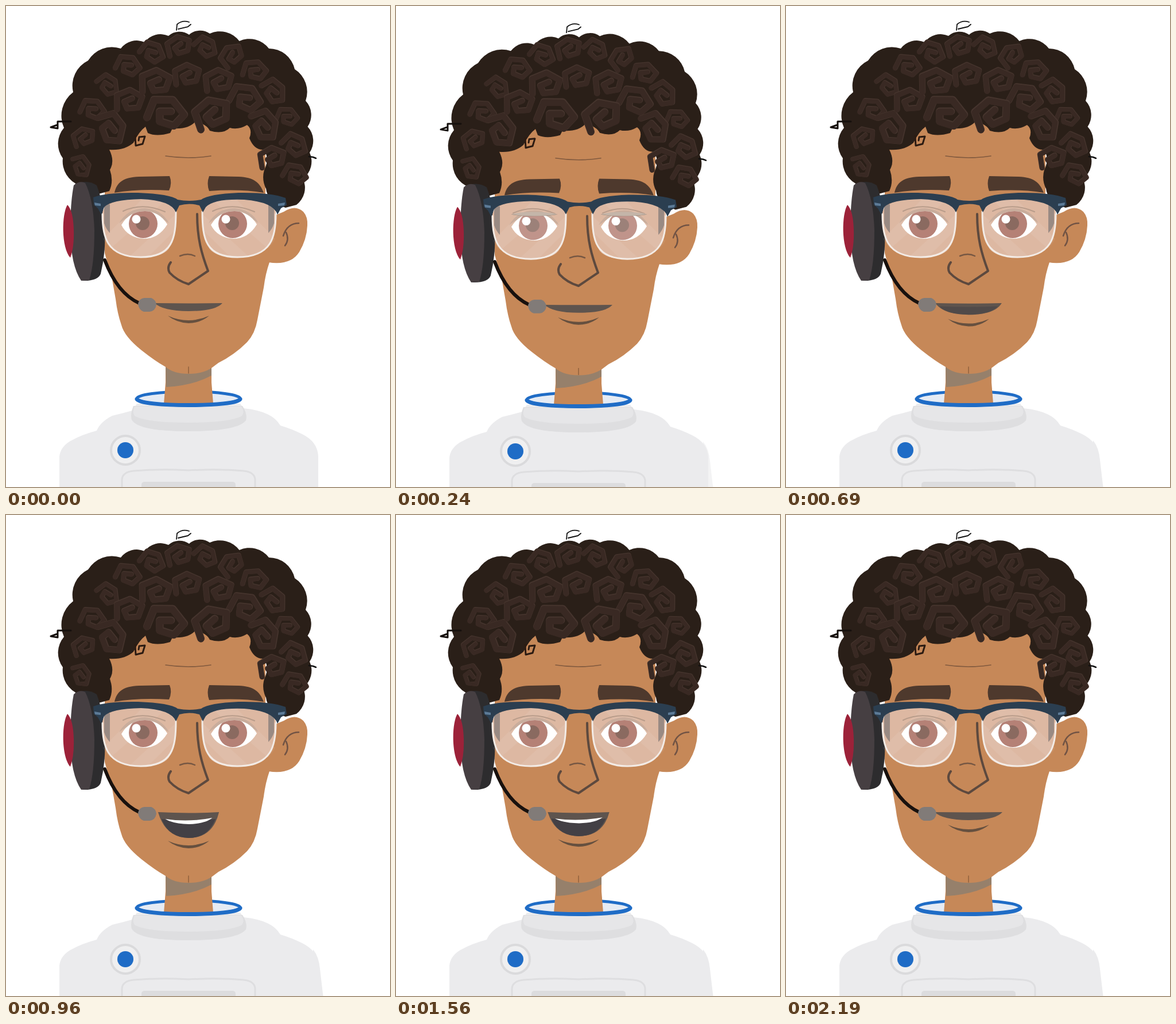
Animation of 669 by 837 pixels, one loop 2.22 s. Source, as an HTML page:

```html
<!DOCTYPE html>
<html lang="en">
<head>
<meta charset="utf-8">
<title>Talking character</title>
<style>
@property --dip { syntax: "<number>"; inherits: true; initial-value: 0; }
@property --blink { syntax: "<number>"; inherits: true; initial-value: 0; }
@property --open { syntax: "<number>"; inherits: true; initial-value: 0; }
@property --brow { syntax: "<number>"; inherits: true; initial-value: 0; }

html, body { margin: 0; width: 100%; height: 100%; overflow: hidden; background: #fff; }
svg {
  display: block; width: 100vw; height: 100vh;
  animation: dip 2220ms ease-in-out infinite, blink 2220ms linear infinite,
    talk 2220ms ease-in-out infinite, brow 2220ms ease-in-out infinite;
}
@keyframes dip { 0% { --dip: 0 } 5.4%, 6.8% { --dip: 1 } 14.9%, 100% { --dip: 0 } }
@keyframes blink { 0%, 1% { --blink: 0 } 4%, 7.4% { --blink: 1 } 11.5%, 100% { --blink: 0 } }
@keyframes brow { 0% { --brow: 0 } 5.4%, 6.8% { --brow: 5 } 14.9%, 17% { --brow: -3 } 25%, 100% { --brow: 0 } }
@keyframes talk {
  0%, 13% { --open: 0 }
  16.2% { --open: .24 }
  22.5% { --open: .7 }
  31.1% { --open: .2 }
  43.2% { --open: 1 }
  57% { --open: .3 }
  70.3% { --open: .9 }
  97%, 100% { --open: 0 }
}
@keyframes widen { 0%, 9% { opacity: 0 } 12%, 100% { opacity: 1 } }

#body { transform: translateY(calc(var(--dip) * 4px)); }
#head { transform: translateY(calc(var(--dip) * 9.2px)) scaleY(calc(1 - var(--dip) * .0066)); }
#brows { transform: translateY(calc(var(--brow) * 1px)); }
.lid { transform-origin: 240px 355px; transform: scaleY(var(--blink)); }
.ball { opacity: calc(1 - var(--blink)); }
#mouth {
  transform-origin: 318px 517px;
  transform: scale(calc(1 - var(--open) * .1), calc(.31 + var(--open) * .69));
}
#cavity { opacity: calc(var(--open) * 2.5); }
#teeth { opacity: calc(var(--open) * 2.4 - .6); }
#lip { transform: translateY(calc(var(--open) * 28px)); }
#flare { animation: widen 2220ms linear infinite; }
.line { fill: none; stroke-linecap: round; stroke-linejoin: round; }
</style>
</head>
<body>
<svg viewBox="0 0 669 837" preserveAspectRatio="none">
  <defs>
    <path id="swirl" d="M-42 36L-46 -16L0 -38L46 -16L34 24L-6 30L-18 6L10 -8" />
    <path id="lens" d="M168 360Q170 337 230 335Q294 337 296 358Q298 400 283 423Q272 437 235 437Q195 436 180 417Q168 397 168 360Z" />
    <clipPath id="eyeClip"><path d="M201 381Q215 357 242 357Q268 358 281 380Q266 405 240 405Q212 403 201 381Z" /></clipPath>
    <g id="eye">
      <path d="M197 378Q212 352 242 352Q270 353 284 378Q262 361 240 361Q215 363 197 378Z" fill="#c9ad9c" />
      <path d="M204 357Q238 341 277 358" class="line" stroke="#b89c8a" stroke-width="2" />
      <g clip-path="url(#eyeClip)">
        <rect x="195" y="350" width="92" height="60" fill="#fff" />
        <g class="ball">
          <circle cx="239" cy="379" r="25" fill="#b58176" />
          <circle cx="238" cy="378" r="12" fill="#8a6a60" />
          <circle cx="227" cy="371" r="7.5" fill="#fff" />
        </g>
      </g>
      <g class="lid">
        <path d="M201 380Q212 355 241 355Q269 355 281 380Q266 400 240 400Q214 399 201 380Z" fill="#c4b5a9" />
        <path d="M202 382Q216 401 241 401Q266 400 280 382" class="line" stroke="#91857a" stroke-width="3" />
      </g>
    </g>
  </defs>

  <g id="body">
    <path id="flare" d="M535 756Q545 768 547 790L554 850H530Z" fill="#ebebed" />
    <path d="M93 850V785Q94 768 112 757Q134 745 158 739Q164 724 185 713Q202 709 220 704L228 692H408L414 700Q442 703 457 711Q471 718 478 730Q498 736 516 745Q543 758 544 784V850Z" fill="#ebebed" />
    <path d="M222 696Q216 711 219 720Q230 740 317 740Q404 740 418 721Q421 710 412 696Z" fill="#dedee0" />
    <path d="M224 697Q219 708 225 714Q248 725 317 725Q387 725 410 714Q417 707 410 697Z" fill="#e6e6e8" />
    <path d="M202 850V824Q203 811 222 809Q270 805 318 808Q370 805 414 809Q433 811 434 824V850" class="line" stroke="#dedee0" stroke-width="3" />
    <path d="M236 850V833Q236 828 242 828H394Q400 828 400 833V850Z" fill="#dcdcde" />
    <circle cx="208" cy="773" r="25" fill="#efeff0" stroke="#dadadc" stroke-width="4" />
    <circle cx="208" cy="773" r="14" fill="#1f6cc6" />
    <ellipse cx="318" cy="683" rx="90" ry="12" fill="#e5ebf4" stroke="#1f6cc6" stroke-width="5" />
    <path d="M278 615H358V655L361 692H275L278 655Z" fill="#c68858" />
    <path d="M278 622H358V643Q325 661 279 663Z" fill="#96806b" />
    <path d="M228 684C232 698 404 698 408 684" class="line" stroke="#1f6cc6" stroke-width="7" />
  </g>

  <g id="head">
    <path d="M450 372L484 358Q504 345 518 358Q526 367 525 382Q524 406 511 428Q496 452 457 446Z" fill="#c68858" />
    <path d="M510 378Q490 378 483 400M488 394Q494 407 486 417" class="line" stroke="#715344" stroke-width="2.5" />
    <path d="M180 180H452V350L459 446Q452 466 449 490L438 546Q434 570 420 585Q398 607 370 621L358 630Q340 641 317 640Q292 640 278 628Q260 618 236 599Q206 575 201 555Q194 535 191 510L185 476L172 430V250Z" fill="#c68858" />
    <path d="M278 261Q318 267 357 261" class="line" stroke="#80593e" stroke-width="1.6" />
    <path id="hair" fill="#2a1f18" />
    <g id="curls" class="line" />
    <path d="M113 201H90V213L78 211L89 207" class="line" stroke="#15100d" stroke-width="3" />
    <path d="M297 42L298 32Q307 24 319 28M300 40L317 36L322 32" class="line" stroke="#111" stroke-width="1.8" />
    <path d="M528 262L535 263L540 265" class="line" stroke="#111" stroke-width="2.5" />
    <path d="M225 226L226 243L238 240L242 227L232 228L231 234" class="line" stroke="#2c1b12" stroke-width="3" />

    <g id="brows" fill="#4e392d">
      <path d="M189 325C193 307 204 298 232 297L285 296Q290 308 284 321Q230 318 189 325Z" />
      <path d="M354 296L405 297C432 298 442 307 449 325Q408 318 354 322Q349 309 354 296Z" />
    </g>

    <path d="M333 362C333 405 341 432 352 461L318 484Q298 478 285 464Q280 455 287 446" class="line" stroke="#5d493e" stroke-width="4" />
    <path d="M303 435Q317 429 329 435" class="line" stroke="#765743" stroke-width="2.5" />

    <g id="earphone">
      <path d="M120 310Q142 301 158 312Q169 340 172 380Q175 425 165 466Q160 479 133 478Z" fill="#2d2c2e" />
      <path d="M118 312Q128 303 138 308Q152 335 154 390Q154 450 145 477L131 478Q113 452 112 392Q112 342 118 312Z" fill="#463f42" />
      <path d="M107 346C97 362 96 420 112 438Q119 420 118 389Q117 356 107 346Z" fill="#9c2239" />
    </g>

    <g id="glasses">
      <g id="pane">
        <use href="#lens" fill="#ddb8a2" />
        <path d="M169 405L237 336H281L182 422Q174 415 169 405ZM214 437L297 361L296 389L246 438Z" fill="#fff" opacity=".07" />
        <path d="M171 345H181V395Q174 388 171 378Z" fill="#998a83" />
        <path d="M168 362C168 400 174 437 235 437C290 437 296 405 296 358" class="line" stroke="#f3ebe5" stroke-width="3" />
      </g>
      <use href="#pane" transform="translate(638) scale(-1 1)" />
      <use href="#eye" />
      <use href="#eye" x="156" />
      <path d="M152 333Q175 324 230 325Q286 327 299 337Q319 341 340 337Q354 327 405 325Q460 324 487 334L489 346L479 352L473 363Q466 341 415 337Q362 335 348 350L343 359L337 347Q319 342 302 347L296 359Q288 338 235 336Q183 337 171 350L166 363L160 352L153 346Z" fill="#2b3e50" />
      <path d="M154 342L165 344V348L155 347ZM486 342L474 344V348L485 347Z" fill="#5d7b97" />
    </g>

    <g id="mouth">
      <path d="M259 517Q318 520 377 517Q365 562 318 562Q273 561 259 517Z" fill="#5e544e" />
      <path id="cavity" d="M266 529Q318 535 370 529Q356 562 318 562Q279 561 266 529Z" fill="#434045" />
      <path id="teeth" d="M273 529Q318 535 364 527Q351 537 319 538Q287 537 273 529Z" fill="#fff" />
    </g>
    <path id="lip" d="M282 539Q318 555 354 539Q338 552 318 552Q297 551 282 539Z" fill="#66503f" />
    <path d="M318 628V639" class="line" stroke="#94643f" stroke-width="1.6" />

    <path d="M172 442Q194 500 232 517" class="line" stroke="#18110e" stroke-width="6" />
    <path d="M230 518Q232 509 241 508H253Q261 511 262 520Q260 531 250 532H240Q231 529 230 518Z" fill="#817b78" />
  </g>
</svg>
<script>
const $ = id => document.getElementById(id);

// The outer hair edge: key points, each span split into round tufts.
const edge = [
  [128, 312], [99, 265], [101, 212], [117, 150], [143, 95], [200, 74], [283, 52], [355, 48],
  [458, 74], [503, 110], [522, 165], [529, 255], [506, 346]
];
const hairline = `L487 351Q455 340 453 318Q445 302 450 285Q458 270 452 254L447 250Q432 250 424 230
  Q430 215 420 207Q405 216 390 212Q378 224 355 217Q350 206 330 201Q318 215 290 213L286 221
  Q262 228 247 221L243 210Q232 218 222 238Q206 252 180 250Q190 270 181 285Q188 305 180 322L150 330Z`;

function tufts([x0, y0], [x1, y1]) {
  const length = Math.hypot(x1 - x0, y1 - y0);
  const count = Math.round(length / 46) || 1;
  const r = length / count * .8;
  return Array.from({ length: count }, (_, i) => {
    const k = (i + 1) / count;
    return `A${r} ${r} 0 0 1 ${x0 + (x1 - x0) * k} ${y0 + (y1 - y0) * k}`;
  }).join("");
}
$("hair").setAttribute("d",
  `M${edge[0]}` + edge.slice(1).map((p, i) => tufts(edge[i], p)).join("") + hairline);

// Curls sit on three arcs over the forehead, with seeded turns.
let seed = 7;
const random = () => (seed = seed * 16807 % 2147483647) / 2147483647;
const stroke = (color, width, dy) =>
  `<use href="#swirl" y="${dy}" stroke="${color}" stroke-width="${width}"/>`;

function arc(count, from, to, rx, ry, size) {
  return Array.from({ length: count }, (_, i) => {
    const a = (from + (to - from) * i / (count - 1)) * Math.PI / 180;
    const x = 318 + rx * Math.cos(a), y = 272 + ry * Math.sin(a);
    const scale = size * (.9 + random() * .2) / 105;
    return `<g transform="translate(${x} ${y}) rotate(${random() * 130 - 40}) scale(${scale})">
      ${stroke("#45342d", 21, -1)}${stroke("#392923", 18, 1)}</g>`;
  }).join("");
}
$("curls").innerHTML =
  arc(14, 178, 366, 187, 203, 42) + arc(8, 203, 357, 146, 152, 52) + arc(2, 242, 300, 82, 98, 66);
</script>
</body>
</html>
```
